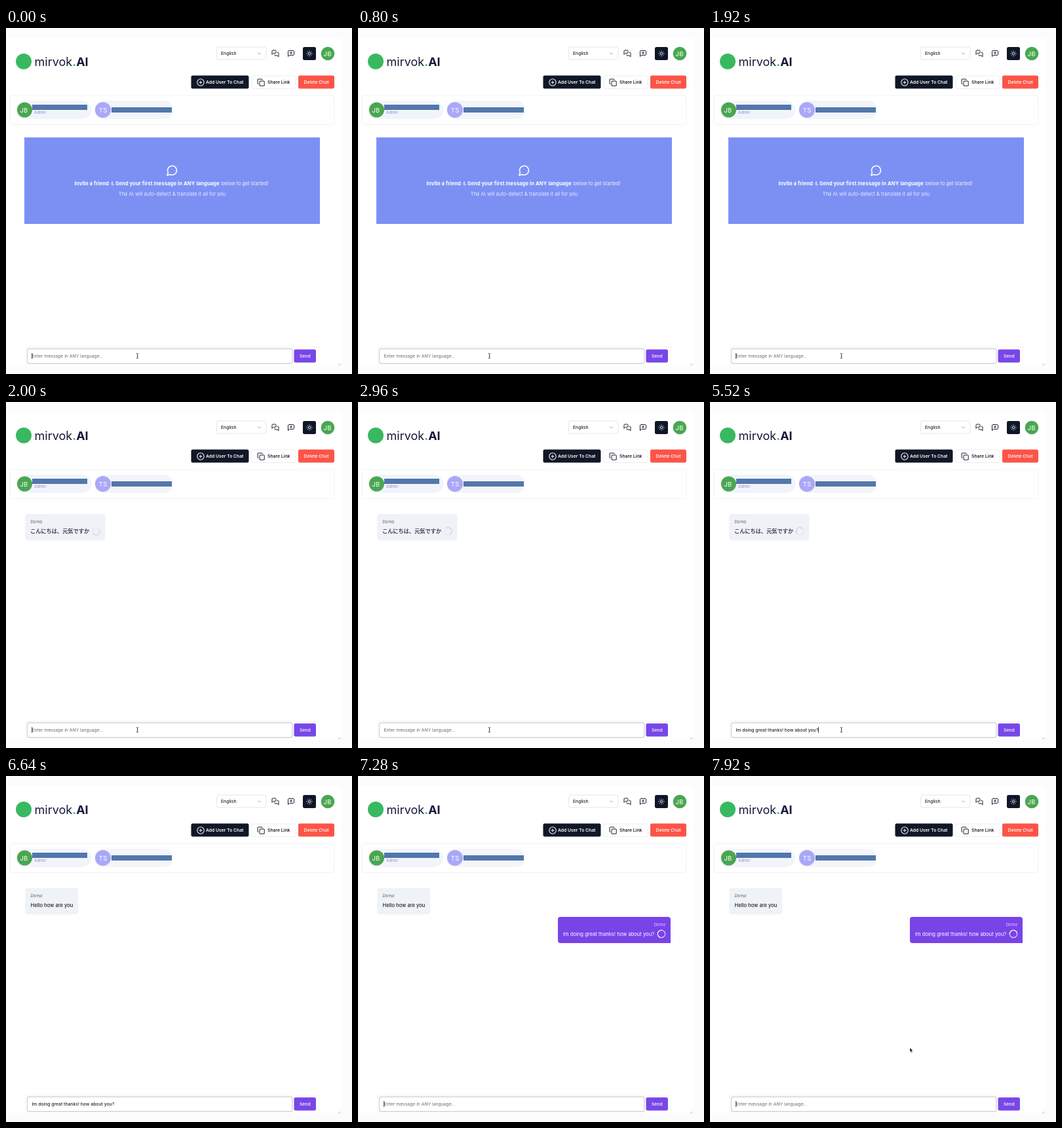
Animation of 528x528 px, one loop 8000 ms. Source, as an HTML page:

```html
<!DOCTYPE html>
<html lang="en">
<head>
<meta charset="utf-8">
<title>Chat with live translation</title>
<style>
  html, body { margin: 0; width: 100%; height: 100%; overflow: hidden; background: #fcfcfc; }
  svg { display: block; width: 100vw; height: 100vh; font: 500 6.8px Inter, sans-serif; }
  text { white-space: pre; }
  .soft { filter: blur(.3px); }
  .icon { fill: none; stroke: #1b2130; stroke-width: 2; stroke-linecap: round; stroke-linejoin: round; }
  .light { stroke: #fff; }
  .bold { font-weight: 600; }
  .white { fill: #fff; }
  .mid { text-anchor: middle; }
  .initials { font-size: 9.5px; font-weight: 400; letter-spacing: .3px; fill: #fff; text-anchor: middle; }
  .author { font-size: 6px; font-weight: 400; font-style: italic; }
  .message { font-size: 7.6px; }
  .strong { font-size: 7.85px; font-weight: 700; fill: #fff; }
  .japanese { font: 500 8.2px "Noto Sans CJK JP", "Noto Sans CJK", sans-serif; stroke: #20242d; stroke-width: .2; }
  .spinner { fill: none; stroke-width: 1.2; }
</style>
</head>
<body>
<svg viewBox="0 0 528 528" fill="#20242d">
  <path fill="#fff" d="M0 15H507Q512 15 512 20V510Q512 515 507 515H0Z"/>
  <path d="M507.500 514.500L510.500 512.500" stroke="#aaa" stroke-width="1"/>

  <!-- brand -->
  <circle cx="27" cy="51" r="12" fill="#38b95f"/>
  <text x="43.500" y="58" font-size="18" font-weight="400" fill="#15193a">mirvok<tspan fill="#38b95f" font-weight="700">.</tspan><tspan font-weight="700">AI</tspan></text>

  <g class="soft">
    <!-- header -->
    <rect x="321.500" y="29" width="75.500" height="19" rx="2.500" fill="#fff" stroke="#e4e6eb"/>
    <text x="328" y="41.300">English</text>
    <path class="icon" style="stroke:#888;stroke-width:.8" d="M384.500 38l2 2 2-2"/>
    <g class="icon" transform="translate(405 33) scale(.5)">
      <path d="M14 9a2 2 0 0 1-2 2H6l-4 4V4a2 2 0 0 1 2-2h8a2 2 0 0 1 2 2z"/>
      <path d="M18 9h2a2 2 0 0 1 2 2v11l-4-4h-6a2 2 0 0 1-2-2v-1"/>
    </g>
    <path class="icon" transform="translate(429 33) scale(.5)" d="M21 15a2 2 0 0 1-2 2H7l-4 4V5a2 2 0 0 1 2-2h14a2 2 0 0 1 2 2zM12 7v6M9 10h6"/>
    <rect x="453" y="29" width="20" height="20" rx="2.500" fill="#0e1628"/>
    <g class="icon light" transform="translate(463 39) scale(.42)">
      <circle r="4"/>
      <path d="M0-10v2M0 8v2M-10 0h2M8 0h2M-7-7l1.400 1.400M5.600 5.600L7 7M-7 7l1.400-1.400M5.600-5.600L7-7"/>
    </g>

    <!-- actions -->
    <rect x="282.500" y="72.500" width="88" height="20" rx="2.500" fill="#101726"/>
    <g class="icon light" transform="translate(297 83) scale(.52)"><circle r="10"/><path d="M-4 0h8M0-4v8"/></g>
    <text class="bold white" x="305" y="85.300">Add User To Chat</text>
    <rect x="375" y="73" width="67" height="19.500" rx="2.500" fill="#fff" stroke="#eceef1"/>
    <g class="icon" transform="translate(383 77) scale(.51)">
      <rect x="8" y="8" width="14" height="14" rx="2"/>
      <path d="M4 16c-1.100 0-2-.9-2-2V4c0-1.100.9-2 2-2h10c1.100 0 2 .9 2 2"/>
    </g>
    <text class="bold" x="399" y="85.300">Share Link</text>
    <rect x="446" y="72.500" width="55" height="20" rx="2.500" fill="#fc5548"/>
    <text class="white mid" x="473.500" y="85.300">Delete Chat</text>

    <!-- member list -->
    <rect x="6" y="103" width="495" height="44.500" rx="4" fill="#fff" stroke="#f2f2f4"/>
    <rect x="15" y="111" width="115" height="28" rx="14" fill="#f2f4fb"/>
    <rect x="135" y="111" width="120.500" height="28" rx="14" fill="#f4f4fb"/>
    <text x="43" y="130.800" font-size="6" font-weight="400" fill="#8c8cd6">Admin</text>
  </g>

  <circle cx="491" cy="39" r="10.300" fill="#4aa650"/>
  <text class="initials" x="490.700" y="42.600">JB</text>
  <circle cx="28.500" cy="125" r="11.500" fill="#4aa650"/>
  <text class="initials" x="27.500" y="128.600">JB</text>
  <rect x="40" y="117" width="84" height="8" fill="#5277ab"/>
  <circle cx="148" cy="125" r="12" fill="#a9a8f8"/>
  <text class="initials" x="148.200" y="128.600">TS</text>
  <rect x="161" y="121" width="92" height="8" fill="#5277ab"/>

  <g class="soft">
    <g id="banner">
      <rect x="28" y="167" width="451" height="132" fill="#7c90f4"/>
      <path class="icon light" transform="translate(244.300 208) scale(.77)" d="M7.900 20A9 9 0 1 0 4 16.100L2 22Z"/>
      <text y="240" font-size="7.420" font-weight="400" fill="#f1f3ff"><tspan x="104.500" class="strong">Invite a friend</tspan><tspan x="160">&amp;</tspan><tspan x="167" class="strong">Send your first message in ANY language</tspan><tspan x="328.500">below to get started!</tspan></text>
      <text class="mid" x="253.500" y="256" font-size="7.500" font-weight="400" fill="#e8ecff">The AI will auto-detect &amp; translate it all for you</text>
    </g>

    <g id="incoming">
      <rect id="incomingBox" x="29.500" y="171" width="122" height="40.300" rx="4" fill="#eff2f6"/>
      <text class="author" x="37.500" y="185.300" fill="#555b66">Dorna</text>
      <text id="japanese" class="japanese" x="37" y="200.300">こんにちは、元気ですか</text>
      <text id="english" class="message" x="37.500" y="200">Hello how are you</text>
      <g id="incomingSpinner" class="spinner">
        <circle cx="137.300" cy="197.300" r="5.700" stroke="#e4e7eb"/>
        <path id="arc" stroke="#d2d6db" d="M143 197.300a5.700 5.700 0 0 1-11.400 0"/>
      </g>
    </g>

    <g id="reply">
      <path fill="#7a43e8" d="M309 215H473Q477 215 477 219V255H309Q305 255 305 251V219Q305 215 309 215Z"/>
      <text class="author" x="469" y="229" text-anchor="end" fill="#e2d5ff">Dorna</text>
      <text class="message white" x="313" y="243.800" style="font-weight:400">Im doing great thanks! how about you?</text>
      <g class="spinner">
        <circle cx="463" cy="241" r="5.700" stroke="#d9caff"/>
        <path id="replyArc" stroke="#efe7ff" d="M468.700 241a5.700 5.700 0 0 1-11.400 0"/>
      </g>
    </g>

    <!-- composer -->
    <path d="M30 514V487H477V514" fill="none" stroke="#f3f3f5"/>
    <rect x="32.500" y="489.500" width="404.500" height="22.500" rx="3" fill="#fff" stroke="#d0d4db" stroke-width="1.300"/>
    <text id="placeholder" x="39.500" y="503" font-weight="400" fill="#666b75">Enter message in ANY language...</text>
    <text id="typed" x="39.500" y="503"></text>
    <rect id="caret" y="496" width=".9" height="9" fill="#222"/>
    <rect x="439.500" y="490.500" width="33.500" height="20" rx="2.500" fill="#7847e8"/>
    <text class="white mid" x="456.300" y="503.200">Send</text>

    <path id="ibeam" fill="none" stroke="#333" stroke-width=".8" d="M198.800 496.500q1.700 0 1.700 1v5.500q0 1-1.700 1M202.200 496.500q-1.700 0-1.700 1v5.500q0 1 1.700 1"/>
    <path id="pointer" fill="#111" stroke="#fff" stroke-width=".5" d="M0 0V6.800L1.500 5.400L2.700 8L3.900 7.400L2.700 5H4.800Z"/>
  </g>
</svg>

<script>
const LOOP = 8000;
const TEXT = 'Im doing great thanks! how about you?';
const ARRIVE = 2000, TYPE = 3000, PAUSE = 3440, RESUME = 3740, TYPED = 4400;
const FREEZE = 5520, TRANSLATE = 6000, SEND = 7120;
const SPIN = 545, BLINK = 550;

const $ = id => document.getElementById(id);
const show = (id, on) => { $(id).style.display = on ? '' : 'none'; };
const progress = (t, from, to) => Math.min(1, Math.max(0, (t - from) / (to - from)));
const blink = elapsed => (elapsed + BLINK) % BLINK < 290;

function typedCount(t) {
  const pauseAt = 'Im doing great '.length;
  return Math.floor(pauseAt * progress(t, TYPE, PAUSE)
    + (TEXT.length - pauseAt) * progress(t, RESUME, TYPED));
}

function caretVisible(t) {
  if (t < TYPE) return blink(t - 265);
  if (t < TYPED) return true;
  if (t < FREEZE) return blink(t - TYPED);
  if (t < TRANSLATE) return true;
  return t >= SEND && blink(t - SEND);
}

function render(t) {
  const translated = t >= TRANSLATE, sent = t >= SEND;
  show('banner', t < ARRIVE);
  show('incoming', t >= ARRIVE);
  show('japanese', !translated);
  show('incomingSpinner', !translated);
  show('english', translated);
  $('incomingBox').setAttribute('width', translated ? 80.5 : 122);
  show('reply', sent);

  const held = t > PAUSE && t < RESUME ? PAUSE : Math.min(t, FREEZE);
  $('arc').setAttribute('transform', `rotate(${(held - ARRIVE) / SPIN * 360 - 30} 137.3 197.3)`);
  $('replyArc').setAttribute('transform', `rotate(${(t - SEND) / SPIN * 360} 463 241)`);

  const text = sent ? '' : TEXT.slice(0, typedCount(t));
  $('typed').textContent = text;
  show('placeholder', !text);
  $('caret').setAttribute('x', 39.3 + (text ? $('typed').getComputedTextLength() : 0));
  show('caret', caretVisible(t));

  const move = progress(t, 7520, 7840), eased = move * move * (3 - 2 * move);
  show('ibeam', !translated);
  show('pointer', t >= 7520);
  $('pointer').setAttribute('transform', `translate(${200 + 105 * eased} ${496 - 81.5 * eased})`);
}

const start = performance.now();
function tick() {
  render((performance.now() - start) % LOOP);
  requestAnimationFrame(tick);
}
tick();
</script>
</body>
</html>
```
